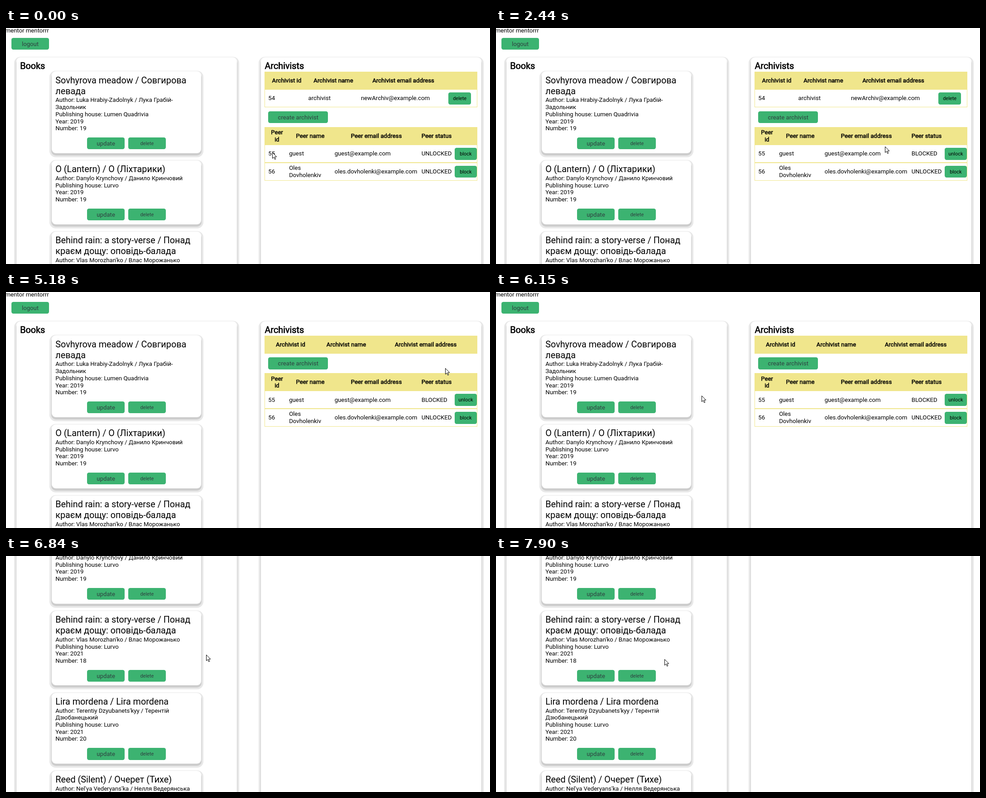
An HTML page for the animation above (8000 ms loop, 1069 by 524 pixels).

```html
<!DOCTYPE html>
<html lang="en">
<head>
<meta charset="utf-8">
<title>Book catalogue</title>
<style>
html, body { margin: 0; width: 100%; height: 100%; overflow: hidden; background: #fff; }
body { position: relative; font: 13.2px/15.675px Roboto, sans-serif; color: #000; }
#page, #lower, #cursor, .panel, .abs { position: absolute; }
#page { left: 0; top: 0; width: 1069px; height: 1400px; }
#lower { left: 0; top: 0; width: 1041px; height: 600px; overflow: hidden; }
#cursor { left: 0; top: 0; overflow: visible; }
.abs { white-space: nowrap; }
.mid { transform: translateX(-50%); text-align: center; }
.bold { -webkit-text-stroke: .5px #000; }
.title { font-size: 19.8px; line-height: 23.925px; }
h2 { margin: 0; font-weight: 400; -webkit-text-stroke: .7px #000; }
.panel, .card { background: #fff; border-radius: 9px; box-shadow: 0 4px 0 1px #cdcdcd, 0 4px 0 5px #e8e8e8; }
.panel { top: 64.6px; width: 487px; height: 1400px; }
.card { box-sizing: border-box; width: 330px; padding: 8.25px; margin-bottom: 16.2px; white-space: nowrap; }
.row { display: flex; justify-content: center; gap: 8.25px; margin-top: 12.1px; }
.btn { box-sizing: border-box; height: 26.5px; line-height: 27px; border-radius: 4.2px; background: #3cb371; color: #2f4040; text-align: center; }
.wide { width: 82.5px; }
.small { font-size: 11px; }
.table { width: 49.5px; color: #000; }
.head, .line { left: 571px; width: 470px; height: 40px; box-sizing: border-box; }
.head { background: #f0e68c; }
.line { border: 1px solid #f0e68c; }
</style>
</head>
<body>
<div id="page">
  <div class="panel" style="left:23px"></div>
  <div class="panel" style="left:563px"></div>
  <div id="books" class="abs" style="left:101px;top:96.4px"></div>
  <div id="upper"></div>
  <div id="lower"></div>
</div>
<svg id="cursor" width="12" height="18"><path d="M.5 .5V13.6L3.6 10.8 5.8 15.8 7.8 14.9 5.6 10H9.8Z" fill="#fff" stroke="#000"/></svg>
<script>
const $ = id => document.getElementById(id);
const at = (x, y, cls, html = '', id = '') =>
  `<div class="abs ${cls}" id="${id}" style="left:${x}px;top:${y}px">${html}</div>`;
// y is the middle of the first text line
const text = (x, y, html, cls = '', id = '') => at(x, y - 7.84, cls, html, id);
const heading = (x, y, html, id) => text(x, y, html, 'mid bold', id);

const books = [
  [['Sovhyrova meadow / Совгирова', 'левада'], ['Luka Hrabiy-Zadolnyk / Лука Грабій-', 'Задольник'], 'Lumen Quadrivia', 2019, 19],
  [['O (Lantern) / О (Ліхтарики)'], ['Danylo Krynchovy / Данило Кринчовий'], 'Lurvo', 2019, 19],
  [['Behind rain: a story-verse / Понад', 'краєм дощу: оповідь-балада'], ["Vlas Morozhan'ko / Влас Морожанько"], 'Lurvo', 2021, 18],
  [['Lira mordena / Lira mordena'], ["Terentiy Dzyubanets'kyy / Терентій", 'Дзюбанецький'], 'Lurvo', 2021, 20],
  [['Reed (Silent) / Очерет (Тихе)'], ["Nel'ya Vederyans'ka / Нелля Ведерянська"], 'Lurvo', 2021, 20]
];
$('books').innerHTML = books.map(([title, author, house, year, count]) => `<div class="card">
  <div class="title">${title.join('<br>')}</div>
  Author: ${author.join('<br>')}<br>Publishing house: ${house}<br>Year: ${year}<br>Number: ${count}
  <div class="row"><div class="btn wide">update</div><div class="btn wide small">delete</div></div></div>`).join('');

$('upper').innerHTML =
  text(-1.5, 5.5, 'mentor mentorrr') +
  at(12.3, 21.5, 'btn wide', 'logout') +
  at(31.2, 72.7, '', '<h2 class="title">Books</h2>') +
  at(571.5, 72.7, '', '<h2 class="title">Archivists</h2>') +
  at(571, 97, 'head') +
  heading(620, 117, 'Archivist id', 'colId') +
  heading(723, 117, 'Archivist name', 'colName') +
  heading(877.5, 117, 'Archivist email address', 'colMail') +
  '<div id="entry">' + at(571, 136, 'line') + text(579.3, 156.3, '54') + text(667.5, 156.3, 'archivist') +
  text(784, 156.3, 'newArchiv@example.com') + at(977.4, 143.4, 'btn table small', 'delete', 'remove') + '</div>';

const peerRow = (y, id, name, mail, n) =>
  at(571, y - 20, 'line') + text(579.3, y, id) + text(625.2, name.includes('<') ? y - 7.8 : y, name) +
  text(725.7, y, mail) + text(917.7, y, 'UNLOCKED', '', 'status' + n) +
  at(990.7, y - 13, 'btn table small', 'block', 'toggle' + n);
$('lower').innerHTML =
  at(579.3, 184.7, 'btn', '<div style="width:132px">create archivist</div>') +
  at(571, 220, 'head') +
  heading(598.5, 232, 'Peer<br>id') + heading(672, 239.8, 'Peer name') +
  heading(818, 239.8, 'Peer email address') + heading(951, 239.8, 'Peer status') +
  peerRow(279, 55, 'guest', 'guest@example.com', 1) +
  peerRow(318.6, 56, 'Oles<br>Dovholenkiv', 'oles.dovholenki@example.com', 2);

// [first change, last change, number of changes]
const runs = [[150, 1170, 9], [1320, 1320, 1], [1600, 2440, 7], [2560, 3610, 9], [3760, 4030, 3], [5030, 5300, 3],
  [5610, 6150, 5], [6300, 6300, 1], [6420, 6720, 3], [6850, 7500, 6], [7650, 7900, 3]];
const ticks = [0, ...runs.flatMap(([a, b, n]) =>
  Array.from({ length: n }, (_, i) => Math.floor((a + (b - a) * i / Math.max(1, n - 1)) / 10) * 10))];

const pointer = [[0, 588, 276], [500, 720, 246], [800, 860, 241], [1170, 1004, 272], [1600, 1006, 274],
  [1880, 850, 345], [2020, 745, 367], [2160, 706, 340], [2440, 859, 263], [2690, 840, 300], [2960, 720, 330],
  [3220, 830, 250], [3610, 1000, 158], [4030, 997, 155], [5030, 997, 155], [5300, 940, 185],
  [6150, 454, 230], [6420, 446, 226], [7500, 433, 201], [7900, 372, 229]];
const scroll = [[0, 0], [6150, 0], [6300, 82], [6420, 165], [6570, 247], [6720, 330], [6850, 330],
  [7370, 0], [7500, 0], [7650, 125], [7770, 247], [7900, 330]];
const hoverBlock = [[0, 1], [1040, 1], [1170, 1.05], [1320, 1.1], [1600, 1.1], [1740, 1]];
const hoverDelete = [[0, 1], [3470, 1], [3610, 1.07], [3760, 1.1]];

function sample(keys, t, k = 1) {
  const i = keys.findIndex(key => key[0] > t);
  if (i < 0) return keys[keys.length - 1][k];
  const a = keys[i - 1], b = keys[i];
  return a[k] + (b[k] - a[k]) * (t - a[0]) / (b[0] - a[0]);
}

function draw(t) {
  const blocked = t >= 1600, deleted = t >= 5030;
  $('page').style.transform = `translateY(${-sample(scroll, t)}px)`;
  $('cursor').style.transform = `translate(${Math.round(sample(pointer, t))}px,${Math.round(sample(pointer, t, 2))}px)`;
  $('status1').textContent = blocked ? 'BLOCKED' : 'UNLOCKED';
  $('toggle1').textContent = blocked ? 'unlock' : 'block';
  $('toggle1').style.transform = `scale(${sample(hoverBlock, t)})`;
  $('remove').style.transform = `scale(${sample(hoverDelete, t)})`;
  $('entry').style.display = deleted ? 'none' : '';
  $('lower').style.top = deleted ? '-39.6px' : '0';
  $('colId').style.left = deleted ? '628.5px' : '620px';
  $('colName').style.left = deleted ? '751.5px' : '723px';
  $('colMail').style.left = deleted ? '927px' : '877.5px';
}

const start = performance.now();
let shown = -1;
function frame() {
  const now = (performance.now() - start) % 8000;
  const tick = ticks.filter(t => t <= now).pop() || 0;
  if (tick !== shown) draw(shown = tick);
  requestAnimationFrame(frame);
}
frame();
</script>
</body>
</html>
```
